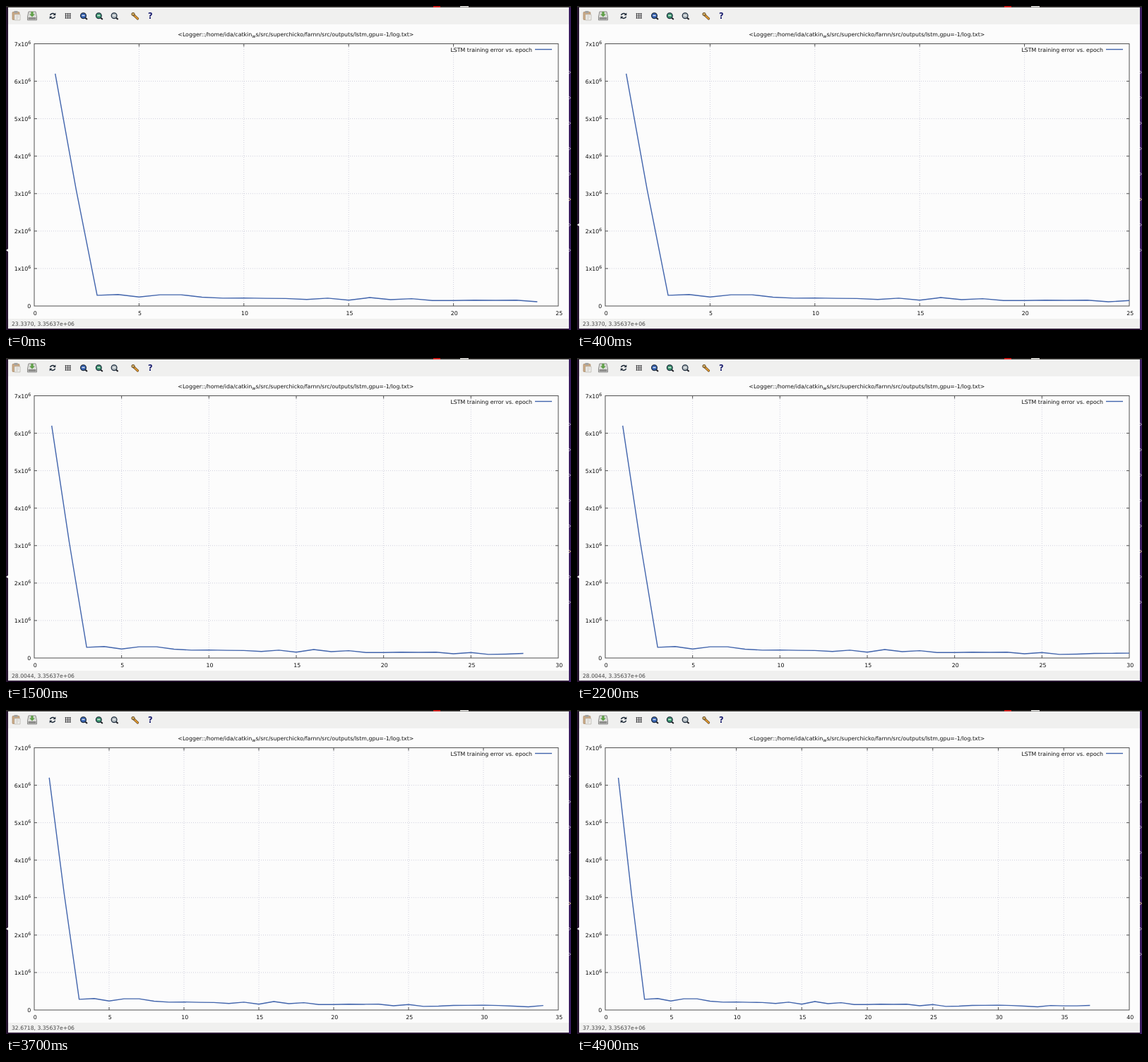
Write an HTML page that moves like this. It is 800x459 px and loops after 5000 ms.

```html
<!DOCTYPE html>
<html lang="en">
<head>
<meta charset="utf-8">
<title>Training error plot</title>
<style>
  html, body { margin: 0; width: 100%; height: 100%; overflow: hidden; background: #fcfcfc; }
  svg { display: block; width: 800px; height: 459px; }
  text { font: 7.86px "DejaVu Sans", sans-serif; fill: #111; }
  .small { font-size: 6.3px; }
  .grid { stroke: #cfcfdc; stroke-dasharray: 1 2; fill: none; }
  .axis { stroke: #505050; fill: none; }
  .curve { stroke: #4164ac; stroke-width: 1.4; stroke-linejoin: round; fill: none; }
</style>
</head>
<body>
<svg viewBox="0 0 800 459" xmlns="http://www.w3.org/2000/svg">
  <rect width="800" height="459" fill="#26142f"/>
  <rect x="797" width="3" height="459" fill="#3a1c60"/>
  <rect x="3" y="2" width="794" height="455" fill="#fcfcfc"/>
  <rect x="3" y="2" width="794" height="24" fill="#f0f0ef"/>
  <rect x="3" y="443" width="794" height="14" fill="#f0f0ef"/>
  <rect width="800" height="2" fill="#2c2a28"/>
  <rect x="605" width="10" height="2" fill="#c8201c"/>
  <rect x="643" width="12" height="1.5" fill="#f0f0ec"/>

  <g id="icons">
    <g transform="translate(14 14)">
      <rect x="-5" y="-5.5" width="10" height="11" rx="1" fill="#c9a884" stroke="#a98a68" stroke-width=".7"/>
      <rect x="-2.5" y="-7" width="5" height="3" fill="#a2a2a0"/>
      <path d="M-2-2H6V6H-2Z" fill="#f0efec" stroke="#b4b0a8" stroke-width=".7"/>
      <path d="M0 0H4M0 2H4M0 4H3" stroke="#bbb8b2" stroke-width=".7"/>
    </g>
    <g transform="translate(37 14)">
      <path d="M-5-6H5L6.5 1V6H-6.5V1Z" fill="#dcdcda" stroke="#777775" stroke-width=".8"/>
      <rect x="-5.5" y="2" width="11" height="3.2" fill="#8e8e8c"/>
      <path d="M-1.6-6H1.6V-2.5H4L0 1.5L-4-2.5H-1.6Z" fill="#5fa048"/>
    </g>
    <g transform="translate(66 14)" fill="none" stroke="#1d2a38" stroke-width="1.5">
      <path d="M-3.5-.8A3.6 3.2 0 0 1 2.8-2.2M3.5 .8A3.6 3.2 0 0 1-2.8 2.2"/>
      <path d="M4.3-4.5V-.8H.6ZM-4.3 4.5V.8H-.6Z" fill="#1d2a38" stroke="none"/>
    </g>
    <path d="M84.5 10V18M87.7 10V18M90.8 10V18M83.5 11H92M83.5 14H92M83.5 17H92" stroke="#48484a"/>
    <path d="M179.5 11.5L186.5 18" stroke="#5a3d1c" stroke-width="3.2" stroke-linecap="round"/>
    <path d="M182 13.8L186.5 18" stroke="#e09a30" stroke-width="2" stroke-linecap="round"/>
    <circle cx="180" cy="11.6" r="2.2" fill="#c9a860" stroke="#5a3d1c" stroke-width=".8"/>
    <text x="204.3" y="18" text-anchor="middle" style="font-size:11.5px;font-weight:bold;fill:#1c2070">?</text>
  </g>

  <text x="243.3" y="43">&lt;Logger::/home/ida/catkin<tspan class="small" dy="2">w</tspan><tspan dy="-2">s/src/superchicko/farnn/src/outputs/lstm,gpu=-1/log.txt&gt;</tspan></text>
  <g id="rows"></g>
  <g id="cols"></g>
  <rect class="axis" x="40" y="53.5" width="742" height="371.5"/>
  <text x="745" y="64.5" text-anchor="end">LSTM training error vs. epoch</text>
  <path class="curve" d="M749 61.5H773"/>
  <path class="curve" id="curve"/>
  <text id="status" x="8" y="453.4" style="font-size:7.65px;fill:#444"></text>

  <g id="outline">
    <path d="M3 2H797V457H3ZM9 5V453H791V5Z" fill="#ededec" fill-rule="evenodd"/>
    <rect x="9" y="4.5" width="782" height="449" fill="none" stroke="#777774" stroke-width="1.6"/>
  </g>
  <g id="marks"></g>
  <path id="pointer" fill="#f2f0f2"/>
</svg>
<script>
const LOOP = 5000, LEFT = 40, WIDTH = 742, TOP = 53.5, BASE = 425;
const ROW = (BASE - TOP) / 7;
const byId = id => document.getElementById(id);

// training error per epoch, in units of 10^6
const errors = [
  6.2, 3.1, .285, .305, .24, .3, .3, .235, .21, .215, .205, .2, .175,
  .21, .155, .225, .17, .195, .145, .145, .155, .152, .155, .112, .145,
  .097, .105, .122, .125, .13, .12, .105, .085, .12, .11, .11, .122
];
const FIRST_COUNT = 24, STEP = 400;

// one epoch every 400 ms; the first two come late
function epochsAt(t) {
  if (t < 300) return FIRST_COUNT;
  if (t < 600) return FIRST_COUNT + 1;
  return Math.min(errors.length, FIRST_COUNT + 1 + Math.floor((t - 100) / STEP));
}

const rowY = v => BASE - v * ROW;

function drawRows() {
  let out = "";
  for (let i = 0; i <= 7; i++) {
    const y = rowY(i);
    if (i % 7) {
      out += `<path class="grid" d="M${LEFT} ${y}h${WIDTH}"/>`;
      out += `<path class="axis" d="M${LEFT} ${y}h4M${LEFT + WIDTH} ${y}h-4"/>`;
    }
    const label = i ? `${i}x10<tspan class="small" dy="-3">6</tspan>` : "0";
    out += `<text x="35.3" y="${y + 3.2}" text-anchor="end">${label}</text>`;
  }
  byId("rows").innerHTML = out;
}

function drawLenses() {
  const colours = ["#3a66b8", "#3f9a70", "#b4bcc0"];
  byId("icons").innerHTML += colours.map((c, i) => {
    const x = 109.5 + i * 21.8;
    return `<path d="M${x + 2.5} 16.5l3 2.5" stroke="#1d1d22" stroke-width="2"/>
      <circle cx="${x}" cy="13.8" r="3.9" fill="${c}" stroke="#1c2b3c" stroke-width="1.2"/>
      <path d="M${x - 2} 13.5h4" stroke="#eceff0" stroke-width="1.3"/>`;
  }).join("");
}

function drawMarks() {
  let out = "";
  for (let i = 0; i < 8; i++) {
    const y = 94 + i * 36, colour = i === 5 ? "#e8c890" : "#b0a4bc";
    out += `<path d="M797 ${y - 2}l2.5 2l-2.5 2" fill="none" stroke="${colour}"/>`;
  }
  byId("marks").innerHTML = out;
}

function drawColumns(max) {
  let out = "";
  for (let v = 0; v <= max; v += 5) {
    const x = LEFT + v / max * WIDTH;
    if (v % max) {
      out += `<path class="grid" d="M${x} ${BASE}V${TOP}"/>`;
      out += `<path class="axis" d="M${x} ${BASE}v-4M${x} ${TOP}v4"/>`;
    }
    out += `<text x="${x + 1.2}" y="437.6" text-anchor="middle">${v}</text>`;
  }
  byId("cols").innerHTML = out;
}

let shownCount = 0;
function drawCurve(count) {
  if (count === shownCount) return;
  shownCount = count;
  const max = Math.ceil(count / 5) * 5;
  drawColumns(max);
  const points = errors.slice(0, count).map((v, i) =>
    `${(LEFT + (i + 1) / max * WIDTH).toFixed(2)} ${rowY(v).toFixed(2)}`);
  byId("curve").setAttribute("d", "M" + points.join("L"));
  byId("status").textContent = (max * .93348).toFixed(4) + ", 3.35637e+06";
}

function render(t) {
  drawCurve(epochsAt(t));
  byId("outline").style.display = t >= 100 && t < 300 ? "" : "none";
  byId("pointer").setAttribute("d", `M3 ${t < 300 ? 344 : 308}v4l-3-2z`);
}

function tick() {
  render(performance.now() % LOOP);
  requestAnimationFrame(tick);
}

drawRows();
drawLenses();
drawMarks();
tick();
</script>
</body>
</html>
```
